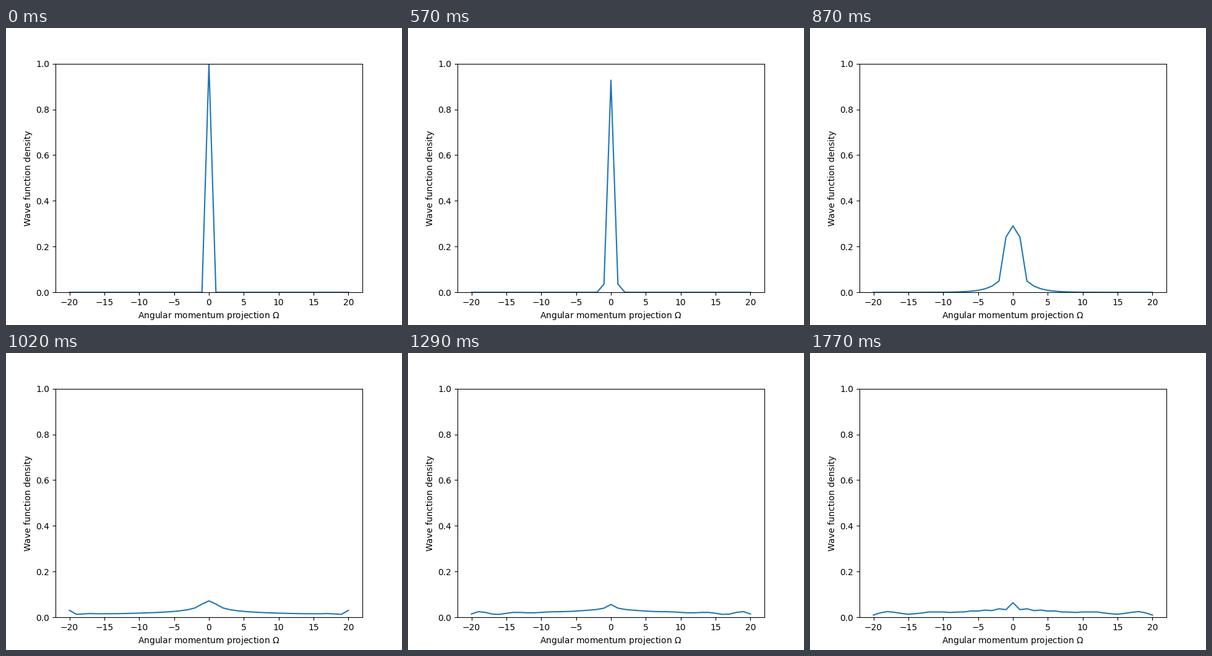
These frames come from a looping animation (640 by 480 pixels, 1.8 s). A matplotlib script:

```python
import numpy as np
import matplotlib.pyplot as plt
from matplotlib.animation import FuncAnimation

FRAMES, INTERVAL = 60, 30
MID, SPREAD = 25, 34  # steps: peak half collapsed, wave reaches the edges
J = 20
omega = np.arange(-J, J + 1)
n = np.arange(1, J + 1)


def center(k):
    """Central density: logistic collapse, then a slow recovery."""
    if k < SPREAD:
        rate = 0.353 if k < MID else 0.332
        return 1 / (1 + np.exp(rate * (k - MID) - 0.435))
    return 0.056 + 0.016 * np.exp((SPREAD - k) / 2) + 0.0005 * max(k - 43, 0)


def narrow_side(k):
    """Steep tail beside the central peak, reaching further with k."""
    tail = 0.0135 * 0.4 ** (n - 2.0)
    tail[0] = 0.177
    return tail * np.exp(-0.34 * (MID - k) * (n - 1))


def wide_side(k):
    """Power law, plus a ripple reflected from the edge and a parity zigzag."""
    fade = np.exp((SPREAD - k) / 2)
    base = (0.041 + 0.016 * fade) * n ** -(0.2 + 0.3 * fade)
    base = np.maximum(base - 0.00035 * (1 - fade) * n, 0.0155)

    s = 1 - np.exp((SPREAD - k) / 12)
    d = J - n
    ripple = (0.0145 - 0.0035 * s) * np.exp(-d / (1 + 6 * s))
    ripple = ripple * np.cos(2 * np.pi * (d - 2.5 * s) / (3 + 4 * s))

    zigzag = 0.0004 * max(k - 43, 0) * (-1.0) ** n / n
    return base + ripple + zigzag


def density(k):
    if k <= MID:
        side = narrow_side(k)
    elif k < SPREAD:
        w = (k - MID) / (SPREAD - MID)
        side = narrow_side(MID) ** (1 - w) * wide_side(SPREAD) ** w
    else:
        side = wide_side(k)
    p0 = center(k)
    side = side * (1 - p0) / (2 * side.sum())
    return np.concatenate([side[::-1], [p0], side])


fig, ax = plt.subplots(figsize=(6.4, 4.8), dpi=100)
line, = ax.plot(omega, density(0))
ax.set_xlim(-22, 22)
ax.set_ylim(0, 1)
ax.set_xlabel(r"Angular momentum projection $\Omega$")
ax.set_ylabel("Wave function density")


def update(k):
    line.set_ydata(density(k))
    return line,


anim = FuncAnimation(fig, update, frames=FRAMES, interval=INTERVAL,
                     repeat=True, repeat_delay=0)
plt.show()
```
